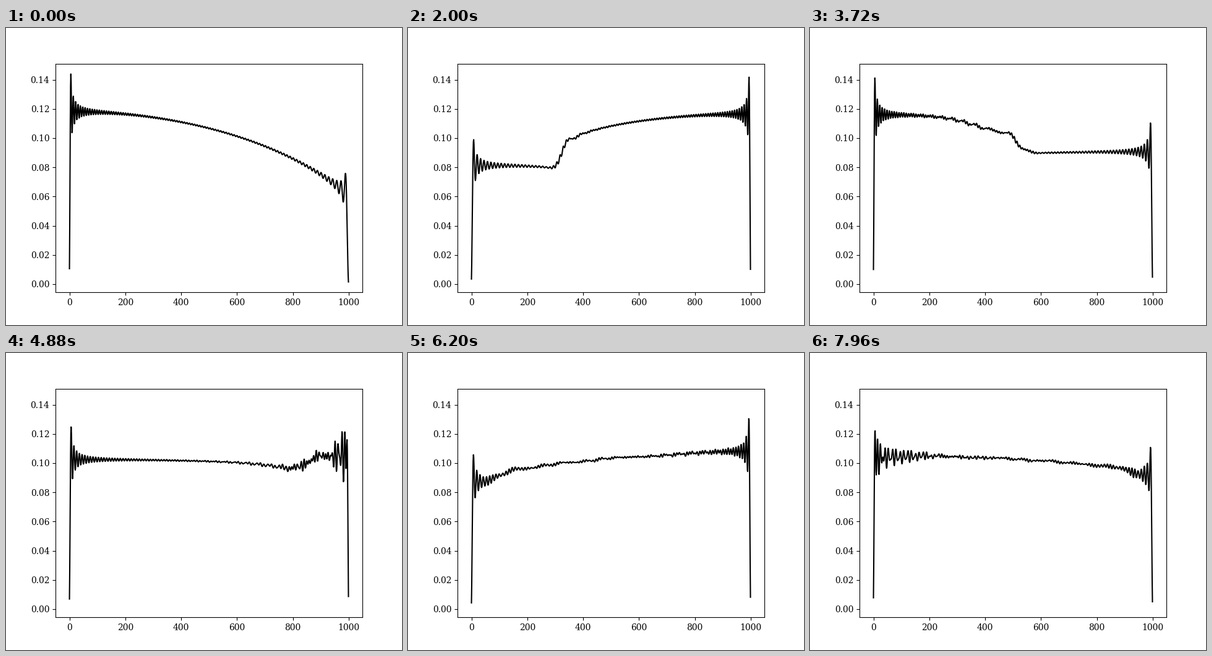
Write a matplotlib script that moves like this. It is 640 px wide and 480 px high and loops after 8000 ms.

```python
import numpy as np
import matplotlib.pyplot as plt
from matplotlib.animation import FuncAnimation

# Free fermions on a hard-walled chain, released from a harmonic trap.
SITES = 1000
FERMIONS = 101
TRAP = 1e-7
MODES = 320
DT = 10000 / 299
FRAMES = 200

plt.rcParams["font.family"] = "DejaVu Serif"

x = np.arange(SITES)


def trapped_orbitals():
    """Lowest orbitals of the chain with the trap centred on the left wall."""
    hop = np.ones(SITES - 1)
    h = np.diag(TRAP * x**2) - np.diag(hop, 1) - np.diag(hop, -1)
    return np.linalg.eigh(h)[1][:, :FERMIONS]


k = np.pi * np.arange(1, MODES + 1) / (SITES + 1)
waves = np.sqrt(2 / (SITES + 1)) * np.sin(np.outer(x + 1, k))
energy = -2 * np.cos(k)
coeffs = waves.T @ trapped_orbitals()


def density(t):
    phase = (energy * t)[:, None]
    re = waves @ (np.cos(phase) * coeffs)
    im = waves @ (np.sin(phase) * coeffs)
    return (re**2 + im**2).sum(axis=1)


fig, ax = plt.subplots(figsize=(6.4, 4.8), dpi=100)
line, = ax.plot(x, density(0), color="black", lw=1.5)
ax.set_xlim(ax.get_xlim())
ax.set_ylim(ax.get_ylim())


def update(i):
    line.set_ydata(density(i * DT))
    return line,


anim = FuncAnimation(fig, update, frames=FRAMES, interval=40,
                     repeat=True, repeat_delay=0)
plt.show()
```
